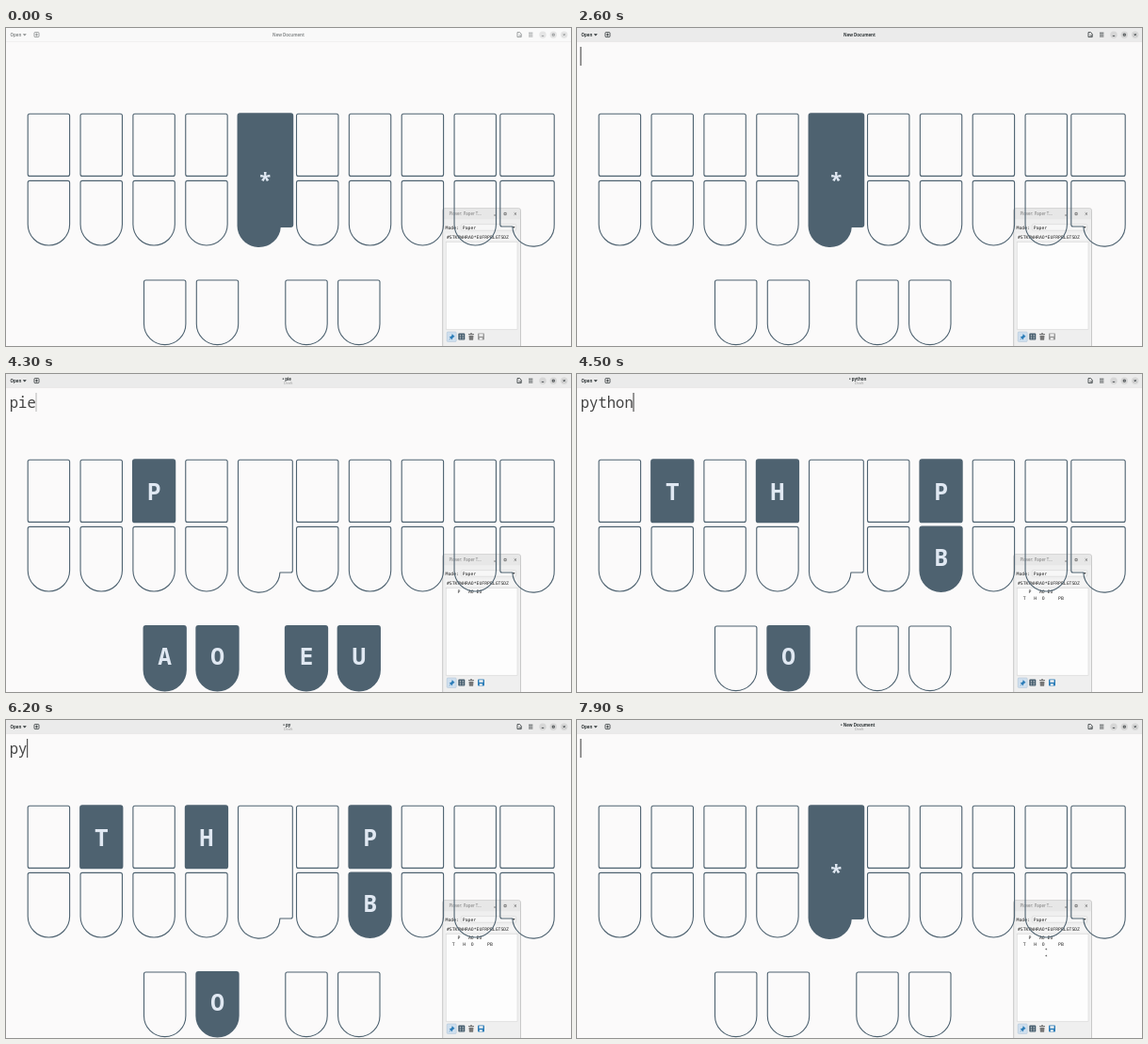
An HTML page for the animation above (8 s loop, 600 by 338 pixels).

```html
<!DOCTYPE html>
<html lang="en">
<head>
<meta charset="utf-8">
<title>Steno typing</title>
<style>
  html, body { margin: 0; width: 100%; height: 100%; overflow: hidden; background: #fbfafa; }
  svg { display: block; width: 100%; height: 100%; }
  .ui { font: 700 4.4px "Open Sans", "Noto Sans", sans-serif; fill: #2e3436; }
  .sub { font-weight: 400; font-size: 3.9px; fill: #999; }
  .line { fill: none; stroke: #2e3436; stroke-width: .8; }
  .mono { font: 4.77px "DejaVu Sans Mono", monospace; fill: #222; }
  .doc { font: 15.56px "Noto Sans Mono", monospace; fill: #444; }
  .key path { fill: none; stroke: #4e6270; stroke-width: 1.1; stroke-linejoin: round; }
  .key text { font: 600 24.5px "Noto Sans Mono", monospace; font-stretch: 85%; fill: #e0e8f2; visibility: hidden; }
  .key .star { font: 700 22px "Open Sans", "Noto Sans", sans-serif; }
  .down path { fill: #4e6270; stroke-width: 1.9; }
  .down text { visibility: visible; }
  .mid { text-anchor: middle; }
</style>
</head>
<body>
<svg viewBox="0 0 600 338">
  <rect width="600" height="338" fill="#fbfafa"/>
  <rect id="bar" width="600" height="14.5"/>
  <path d="M0 14.6H600" stroke="#000" stroke-opacity=".08" stroke-width=".6"/>
  <g id="head" class="ui">
    <text x="4.6" y="8.7">Open</text>
    <path d="M17.8 6.2h4l-2 2.4z"/>
    <g class="line">
      <rect x="30" y="4.6" width="5" height="5" rx=".8"/>
      <path d="M32.5 5.6v3M31 7.1h3"/>
      <path d="M543 4.6h2.6l1.6 1.6v3.4h-4.2zM544.6 8h2.6"/>
      <path d="M555 5.2h4.4M555 7.1h4.4M555 9h4.4"/>
    </g>
    <g fill="#d6d6d6">
      <circle cx="570" cy="7.2" r="3.7"/><circle cx="581.3" cy="7.2" r="3.7"/><circle cx="592.7" cy="7.2" r="3.7"/>
    </g>
    <path class="line" d="M568.8 8.4h2.4M580.3 6.2h2v2h-2zM591.6 6.1l2.2 2.2M593.8 6.1l-2.2 2.2"/>
    <text id="title" class="mid"></text>
    <text id="draft" class="sub mid" x="299.7" y="11.4">Draft</text>
  </g>

  <text id="doc" class="doc" x="3.8" y="35.6"></text>
  <rect id="caret" y="20" width="1" height="20" fill="#333"/>

  <rect x="463.7" y="191.8" width="82.8" height="150" rx="2" fill="#efefef" stroke="#bdbdbd" stroke-width=".8"/>
  <path d="M464.1 203.2v-9q0-2 2-2h78q2 0 2 2v9z" fill="#e7e7e7"/>
  <text class="ui" x="470.6" y="199.2" style="font-weight:400;fill:#777">Plover: Paper T…</text>
  <path class="line" d="M518 199h2.4M529 196.4h2.2v2.2H529zM539.6 196.3l2.4 2.4M542 196.3l-2.4 2.4" style="stroke:#666"/>
  <rect x="483.4" y="208.6" width="58.2" height="6.6" rx=".8" fill="#f7f7f7" stroke="#ccc" stroke-width=".5"/>
  <path d="M537.6 211h3l-1.5 1.9z" fill="#444"/>
  <rect x="467" y="218.6" width="76" height="6.8" fill="#f5f5f5"/>
  <rect x="467.2" y="227.4" width="75.8" height="92.8" fill="#fdfdfd" stroke="#d0d0d0" stroke-width=".5"/>
  <g class="mono">
    <text x="466.6" y="213.6">Mode:</text>
    <text x="484.8" y="213.6">Paper</text>
    <text id="order" x="468" y="223.7"></text>
    <g id="paper"></g>
  </g>
  <rect x="468.2" y="323" width="10" height="10.4" rx="1" fill="#cfdfee" stroke="#a9bfd3" stroke-width=".5"/>
  <path d="M473.6 325l3 3-1.2.4-1.4 1.6-.2 1.4-1.4-1.4-2.2 2 1.8-2.4-1.4-1.4 1.6-.2 1.4-1.4z" fill="#2c7db8"/>
  <rect x="480.3" y="324.6" width="7" height="7" rx=".8" fill="#40596a"/>
  <path d="M481.8 326.4h1.4M484.6 326.4h1.4M481.8 328.2h1.4M484.6 328.2h1.4M481.8 330h1.4M484.6 330h1.4" stroke="#eee" stroke-width=".8"/>
  <path d="M491 325h6v1h-6zM491.5 326.8h5l-.4 5h-4.2zM493 324.2h2v.8h-2z" fill="#777"/>
  <g id="save">
    <rect x="501" y="324.6" width="7" height="7" rx=".8"/>
    <path d="M502.4 325.2h4.2v2.6h-4.2zM502.8 329.2h3v2h-3z" fill="#f2f2f2"/>
  </g>

  <g id="keys"></g>
</svg>
<script>
const $ = id => document.getElementById(id);
const ORDER = '#STKPWHRAO*EUFRPBLGTSDZ';
const STEP = 55.85, W = 44.4, R = W / 2;

// Strokes hold positions in ORDER
const PIE = [4, 8, 9, 11, 12], PYTHON = [2, 6, 9, 15, 16], UNDO = [10];
const STATES = [
  { at: 0, text: '', keys: UNDO, paper: [] },
  { at: 2800, text: 'pie', keys: PIE, paper: [PIE] },
  { at: 4500, text: 'python', keys: PYTHON, paper: [PIE, PYTHON] },
  { at: 6200, text: 'py', keys: PYTHON, paper: [PIE, PYTHON] },
  { at: 6300, text: 'pie', keys: UNDO, paper: [PIE, PYTHON, UNDO] },
  { at: 7900, text: '', keys: UNDO, paper: [PIE, PYTHON, UNDO, UNDO] },
];

const top2 = (x, y, w) => `M${x} ${y + 2}q0-2 2-2h${w - 4}q2 0 2 2`;
const rect = (x, y, w, h) => top2(x, y, w) + `v${h - 4}q0 2-2 2h${4 - w}q-2 0-2-2z`;
const tongue = (x, y) => top2(x, y, W) + `v44.4a${R} ${R} 0 0 1-${W} 0z`;

const keys = {};
function addKey(i, cx, y, path, cls = '') {
  $('keys').insertAdjacentHTML('beforeend',
    `<g class="key"><path d="${path}"/><text class="mid ${cls}" x="${cx}" y="${y}">${ORDER[i]}</text></g>`);
  (keys[i] ||= []).push($('keys').lastChild);
}
const upper = (i, cx) => addKey(i, cx, 133.6, rect(cx - R, 91.2, W, 66.2));
const lower = (i, cx, y = 162.4) => addKey(i, cx, y + 41.4, tongue(cx - R, y));

[[1, 1], [2, 3], [4, 5], [6, 7]].forEach(([a, b], n) => {
  upper(a, 45.4 + n * STEP);
  lower(b, 45.4 + n * STEP);
});
addKey(10, 275.2, 168.6,
  top2(246.5, 91.2, 57.8) + `V209q0 2-2 2H290.9A${R} ${R} 0 0 1 246.5 208.8z`, 'star');
[[13, 14], [15, 16], [17, 18], [19, 20]].forEach(([a, b], n) => {
  upper(a, 330.7 + n * STEP);
  lower(b, 330.7 + n * STEP);
});
addKey(21, 553.5, 133.6, rect(524.8, 91.2, 57.4, 66.2));
addKey(22, 553.5, 203.8,
  top2(524.8, 162.4, 57.4) + `V208.8A${R} ${R} 0 0 1 537.8 211H526.8q-2 0-2-2z`);
[[8, 168.7], [9, 224.5], [11, 319], [12, 374.8]].forEach(([i, cx]) => lower(i, cx, 268));

$('order').textContent = ORDER;

const clamp = v => Math.max(0, Math.min(1, v));

// Visible, fading out, hidden, fading in: 300 ms each
function blink(age) {
  const p = Math.max(0, age) % 1200 / 300;
  return p < 2 ? clamp(2 - p) : clamp(p - 3);
}

let shown;
function show(s) {
  shown = s;
  const dirty = s.paper.length > 0;
  $('title').textContent = (dirty ? '• ' : '') + (s.text || 'New Document');
  $('title').setAttribute('x', dirty ? 298.2 : 300);
  $('title').setAttribute('y', dirty ? 6.7 : 8.7);
  $('draft').style.display = dirty ? '' : 'none';
  $('save').setAttribute('fill', dirty ? '#2c7db8' : '#999');
  $('doc').textContent = s.text;
  $('caret').setAttribute('x', 3.5 + 9.34 * s.text.length);
  for (const i in keys)
    for (const k of keys[i]) k.classList.toggle('down', s.keys.includes(+i));
  $('paper').innerHTML = s.paper.map((stroke, n) => {
    const row = [...ORDER].map((c, i) => stroke.includes(i) ? c : '\u00a0').join('');
    return `<text x="468" y="${233 + n * 6.6}">${row}</text>`;
  }).join('');
}

function draw(now) {
  const t = Math.floor(now % 8000 / 100) * 100;
  const s = STATES.findLast(s => t >= s.at);
  if (s !== shown) show(s);

  const focus = clamp((t - 200) / 200);
  const grey = 249 - 14 * focus;
  $('bar').setAttribute('fill', `rgb(${grey},${grey},${grey})`);
  $('head').setAttribute('opacity', .55 + .45 * focus);
  $('caret').setAttribute('opacity', t < 300 ? 0 : blink(t - (s.at ? s.at + 500 : 200)));
  requestAnimationFrame(draw);
}
draw(performance.now());
</script>
</body>
</html>
```
